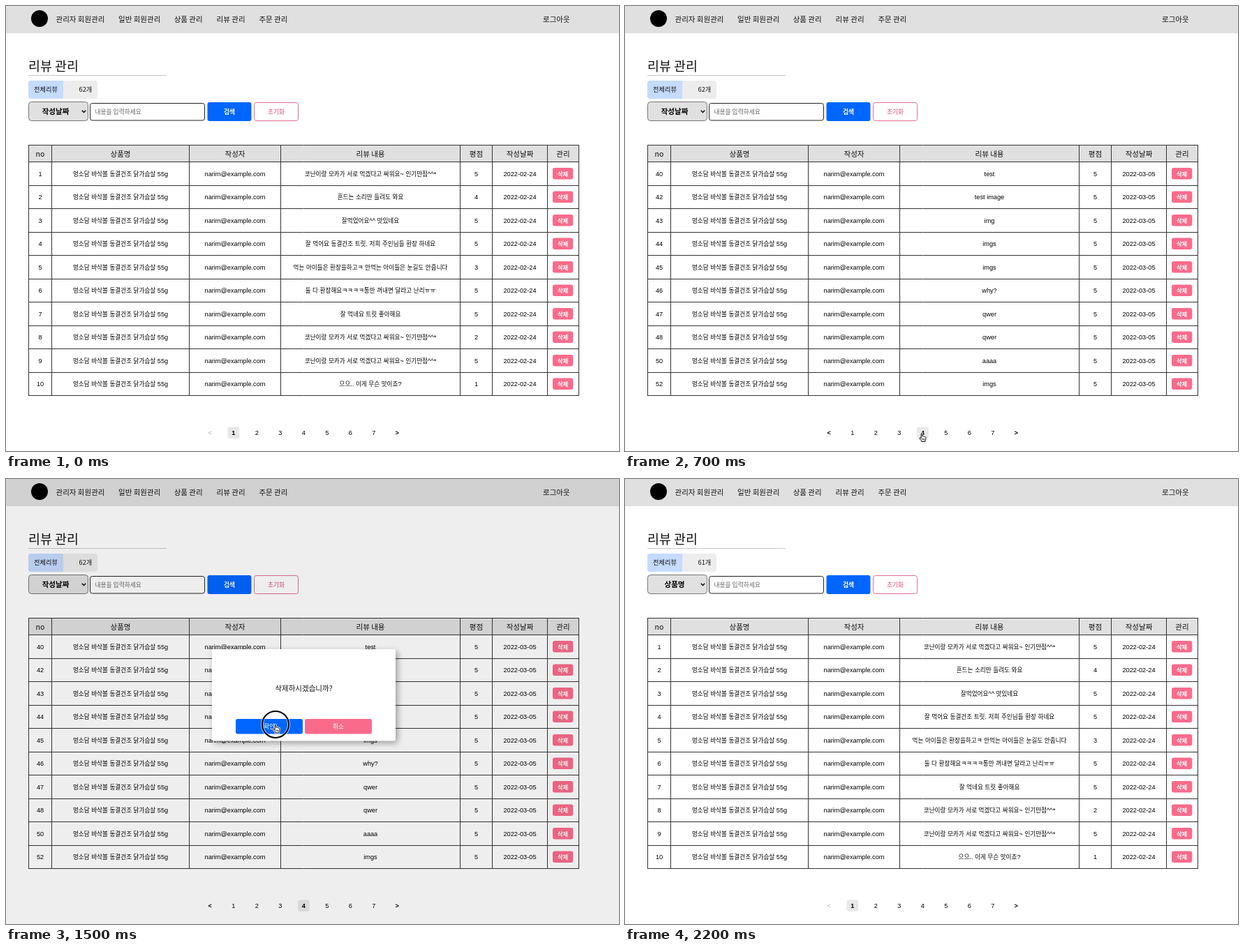
Recreate the animation shown at these times as an HTML page with a canvas. Size 878 px wide and 638 px high, loop 2.82 s.

```html
<!DOCTYPE html>
<html lang="ko">
<head>
<meta charset="utf-8">
<title>리뷰 관리</title>
<style>
html, body { margin: 0; width: 100%; height: 100%; overflow: hidden; background: #fff; }
canvas { display: block; width: 878px; height: 638px; }
</style>
</head>
<body>
<canvas id="stage" width="878" height="638"></canvas>
<script>
const ctx = document.getElementById('stage').getContext('2d');
const LOOP = 2820, STEP = 100;
const KO = '"Noto Sans CJK KR", "Noto Sans CJK JP", "Noto Sans CJK", sans-serif';
const LATIN = '"Liberation Sans", Arial, sans-serif';
const BLUE = '#0066ff', PINK = '#fa6b8b', GRAY = '#e0e0e0', INK = '#111';

const COLS = [32.5, 65.5, 262.5, 393.5, 650.5, 696.5, 775.5, 820.5];
const HEADS = ['no', '상품명', '작성자', '리뷰 내용', '평점', '작성날짜', '관리'];
const PRODUCT = '멍소담 바삭볼 동결건조 닭가슴살 55g';
const EMAIL = 'narim@example.com';
const HAPPY = '코난이랑 모카가 서로 먹겠다고 싸워요~ 인기만점^^*';

const PAGES = {
  1: {
    date: '2022-02-24',
    nos: [1, 2, 3, 4, 5, 6, 7, 8, 9, 10],
    stars: [5, 4, 5, 5, 3, 5, 5, 2, 5, 1],
    reviews: [HAPPY, '흔드는 소리만 들려도 와요', '잘먹었어요^^ 맛있네요',
      '잘 먹어요 동결건조 트릿. 저희 주인님들 환장 하네요',
      '먹는 아이들은 환장을하고ㅋ 안먹는 아이들은 눈길도 안줍니다',
      '둘 다 환장해요ㅋㅋㅋㅋ통만 꺼내면 달라고 난리ㅠㅠ',
      '잘 먹네요 트릿 좋아해요', HAPPY, HAPPY, '으으.. 이게 무슨 맛이죠?']
  },
  4: {
    date: '2022-03-05',
    nos: [40, 42, 43, 44, 45, 46, 47, 48, 50, 52],
    stars: Array(10).fill(5),
    reviews: ['test', 'test image', 'img', 'imgs', 'imgs', 'why?', 'qwer', 'qwer', 'aaaa', 'imgs']
  }
};

// Pointer stops: step, x, y
const PATH = [[1, 560, 470], [3, 425, 612.5], [7, 425, 612.5], [10, 801, 445.5], [12, 801, 445.5],
  [14, 386, 352], [18, 386, 351.5], [19, 128, 122], [21, 70, 582]];
const HAND_STEPS = [3, 4, 5, 6, 7, 10, 11, 14, 15];
const CLICK_STEPS = [4, 11, 15];

const ARROW = new Path2D('M0 0V10.4L2.4 8.2L4 11.8L5.7 11L4.1 7.6H7.3Z');
const HAND = new Path2D('M-.9 .8Q0-.6 .9 .8V4.4Q1.9 3.6 2.6 4.7Q3.6 4 4.2 5.1Q5.3 4.5 5.9 5.9' +
  'V8.6L4.9 10.6V12H-.3V10.8L-3 7.8Q-3.6 6.5-2.4 6.4L-.9 7.6Z');

function box(x, y, w, h, r, fill, line) {
  ctx.beginPath();
  ctx.roundRect(x, y, w, h, r);
  if (fill) { ctx.fillStyle = fill; ctx.fill(); }
  if (line) { ctx.strokeStyle = line; ctx.lineWidth = 1; ctx.stroke(); }
}

function line(x1, y1, x2, y2, color) {
  ctx.beginPath();
  ctx.moveTo(x1, y1);
  ctx.lineTo(x2, y2);
  ctx.strokeStyle = color;
  ctx.lineWidth = 1;
  ctx.stroke();
}

function text(s, x, y, size, { weight = 400, color = INK, align = 'center' } = {}) {
  ctx.font = `${weight} ${size}px ${KO}`;
  ctx.fillStyle = color;
  ctx.textAlign = align;
  ctx.fillText(s, x, y + size * 0.37);
}

// Centred text with Latin and Hangul runs in their own fonts
function mixed(s, x, y, weight = 400, color = '#000') {
  const runs = String(s).match(/[\u3131-\ud7a3]+|[^\u3131-\ud7a3]+/g).map(part => {
    const font = part > '\u3130' ? `${weight} 8.6px ${KO}` : `${weight} 9.2px ${LATIN}`;
    ctx.font = font;
    return { part, font, width: ctx.measureText(part).width };
  });
  x -= runs.reduce((sum, r) => sum + r.width, 0) / 2;
  ctx.fillStyle = color;
  ctx.textAlign = 'left';
  for (const r of runs) {
    ctx.font = r.font;
    ctx.fillText(r.part, x, y + 3.3);
    x += r.width;
  }
}

function drawNav() {
  ctx.fillStyle = GRAY;
  ctx.fillRect(0, 0, 878, 39);
  ctx.beginPath();
  ctx.arc(48, 18, 12, 0, 7);
  ctx.fillStyle = '#000';
  ctx.fill();
  const links = [['관리자 회원관리', 71.5], ['일반 회원관리', 161], ['상품 관리', 240.7],
    ['리뷰 관리', 301.6], ['주문 관리', 362.4], ['로그아웃', 769]];
  for (const [s, x] of links) text(s, x, 19, 10.5, { weight: 500, align: 'left' });
}

function drawFilters(count, sort) {
  text('리뷰 관리', 32, 86.5, 18.4, { weight: 500, align: 'left' });
  line(32, 99.5, 230, 99.5, '#c8c8c8');

  box(32, 107, 99, 26, 4, '#ededed');
  box(32, 107, 50, 26, [4, 0, 0, 4], '#c5dbff');
  text('전체리뷰', 57, 120, 9.2);
  text(count + '개', 123.2, 120, 9.2, { align: 'right' });

  box(32.5, 137.5, 85, 27, 4, GRAY, '#767676');
  text(sort, 71, 151, 10.5, { weight: 700, color: '#000' });
  ctx.beginPath();
  ctx.moveTo(108.8, 149.8);
  ctx.lineTo(111.5, 152.6);
  ctx.lineTo(114.2, 149.8);
  ctx.strokeStyle = '#000';
  ctx.lineWidth = 1.4;
  ctx.stroke();

  box(120.5, 139.5, 164, 24.5, 3, '#fff', '#222');
  text('내용을 입력하세요', 127.5, 151.5, 8.76, { color: '#666', align: 'left' });
  box(288.5, 138, 63, 27, 3, BLUE);
  text('검색', 320, 151.5, 8.76, { weight: 700, color: '#fff' });
  box(355.5, 138.5, 63, 26, 3, '#fff', '#e0708f');
  text('초기화', 387, 151.5, 8.76, { color: '#dc4c74' });
}

function drawTable({ date, nos, stars, reviews }) {
  const mid = COLS.slice(1).map((x, i) => (x + COLS[i]) / 2);
  const rowLine = i => Math.floor(223.5 + 33.5 * i) + 0.5;
  ctx.fillStyle = GRAY;
  ctx.fillRect(32.5, 199.5, 788, 24);
  HEADS.forEach((s, i) => text(s, mid[i], 211.7, 10.5, { weight: 500 }));
  nos.forEach((no, i) => {
    const y = 240.5 + 33.5 * i;
    [no, PRODUCT, EMAIL, reviews[i], stars[i], date].forEach((s, c) => mixed(s, mid[c], y));
    box(783, y - 8.4, 29.3, 16.4, 3, PINK);
    text('삭제', 797.6, y, 8.4, { weight: 700, color: '#fff' });
  });
  line(32, 199.5, 821, 199.5, '#333');
  for (let i = 0; i <= 10; i++) line(32, rowLine(i), 821, rowLine(i), '#333');
  for (const x of COLS) line(x, 199.5, x, 558.5, '#333');
}

function drawPager(page, hover) {
  mixed('<', 292.3, 612, 700, page === 1 ? '#c8c8c8' : '#000');
  for (let n = 1; n <= 7; n++) {
    const x = 292.4 + 33.5 * n;
    if (n === page || n === hover) box(x - 8.3, 603.5, 16.6, 16.6, 3, n === page ? '#e8e8e8' : '#eee');
    mixed(n, x, 612, n === page ? 700 : 400);
  }
  mixed('>', 560.3, 612, 700);
}

function drawModal() {
  ctx.fillStyle = 'rgba(0,0,0,.067)';
  ctx.fillRect(0, 0, 878, 638);
  ctx.save();
  ctx.shadowColor = 'rgba(0,0,0,.35)';
  ctx.shadowBlur = 9;
  ctx.shadowOffsetX = ctx.shadowOffsetY = 3;
  box(295, 244, 263, 131.5, 3, '#fff');
  ctx.restore();
  text('삭제하시겠습니까?', 426.5, 300.5, 10.5, { weight: 500 });
  box(329, 344, 96, 21.5, 3, BLUE);
  box(428, 344, 96, 21.5, 3, PINK);
  text('확인', 377, 354.7, 8.76, { weight: 500, color: '#fff' });
  text('취소', 476, 354.7, 8.76, { weight: 500, color: '#fff' });
}

function drawLoading() {
  ctx.beginPath();
  ctx.arc(426.5, 288.3, 46, -Math.PI * 0.75, -Math.PI * 0.25);
  ctx.strokeStyle = PINK;
  ctx.lineWidth = 6.6;
  ctx.stroke();
  text('잠시만 기다려 주세요.', 426.7, 371, 10.5, { weight: 500 });
}

function pointerAt(k) {
  const i = PATH.findIndex(p => p[0] >= k);
  if (i < 0 || k < PATH[0][0]) return null;
  const b = PATH[i], a = PATH[i - 1] || b;
  const f = b === a ? 0 : (k - a[0]) / (b[0] - a[0]);
  return [a[1] + (b[1] - a[1]) * f, a[2] + (b[2] - a[2]) * f];
}

function drawPointer(k) {
  const at = pointerAt(k);
  if (!at) return;
  const hand = HAND_STEPS.includes(k);
  ctx.save();
  ctx.translate(at[0], at[1]);
  if (CLICK_STEPS.includes(k)) {
    for (const [color, width] of [['rgba(255,255,255,.7)', 4], ['#000', 2]]) {
      ctx.beginPath();
      ctx.arc(0, 0, 19, 0, 7);
      ctx.strokeStyle = color;
      ctx.lineWidth = width;
      ctx.stroke();
    }
  }
  ctx.lineJoin = 'round';
  const shape = hand ? HAND : ARROW;
  ctx.strokeStyle = '#fff';
  ctx.lineWidth = hand ? 2.2 : 1.6;
  ctx.stroke(shape);
  ctx.fillStyle = hand ? '#fff' : '#000';
  ctx.fill(shape);
  if (hand) {
    ctx.strokeStyle = '#000';
    ctx.lineWidth = 1;
    ctx.stroke(shape);
    ctx.lineWidth = 0.7;
    ctx.beginPath();
    for (const x of [0.7, 2.2, 3.7]) { ctx.moveTo(x, 7.6); ctx.lineTo(x, 10); }
    ctx.stroke();
  }
  ctx.restore();
}

function draw(k) {
  ctx.fillStyle = '#fff';
  ctx.fillRect(0, 0, 878, 638);
  drawNav();
  if (k === 16) {
    drawLoading();
  } else {
    const page = k >= 7 && k < 16 ? 4 : 1;
    const deleted = k > 16;
    drawFilters(deleted ? 61 : 62, deleted ? '상품명' : '작성날짜');
    drawTable(PAGES[page]);
    drawPager(page, k >= 3 && k <= 7 ? 4 : 0);
    if (k >= 12 && k < 16) drawModal();
  }
  drawPointer(k);
}

const start = performance.now();
let last = -1;
function tick() {
  const k = Math.floor(((performance.now() - start) % LOOP) / STEP);
  if (k !== last) draw(last = k);
  requestAnimationFrame(tick);
}
tick();
</script>
</body>
</html>
```
